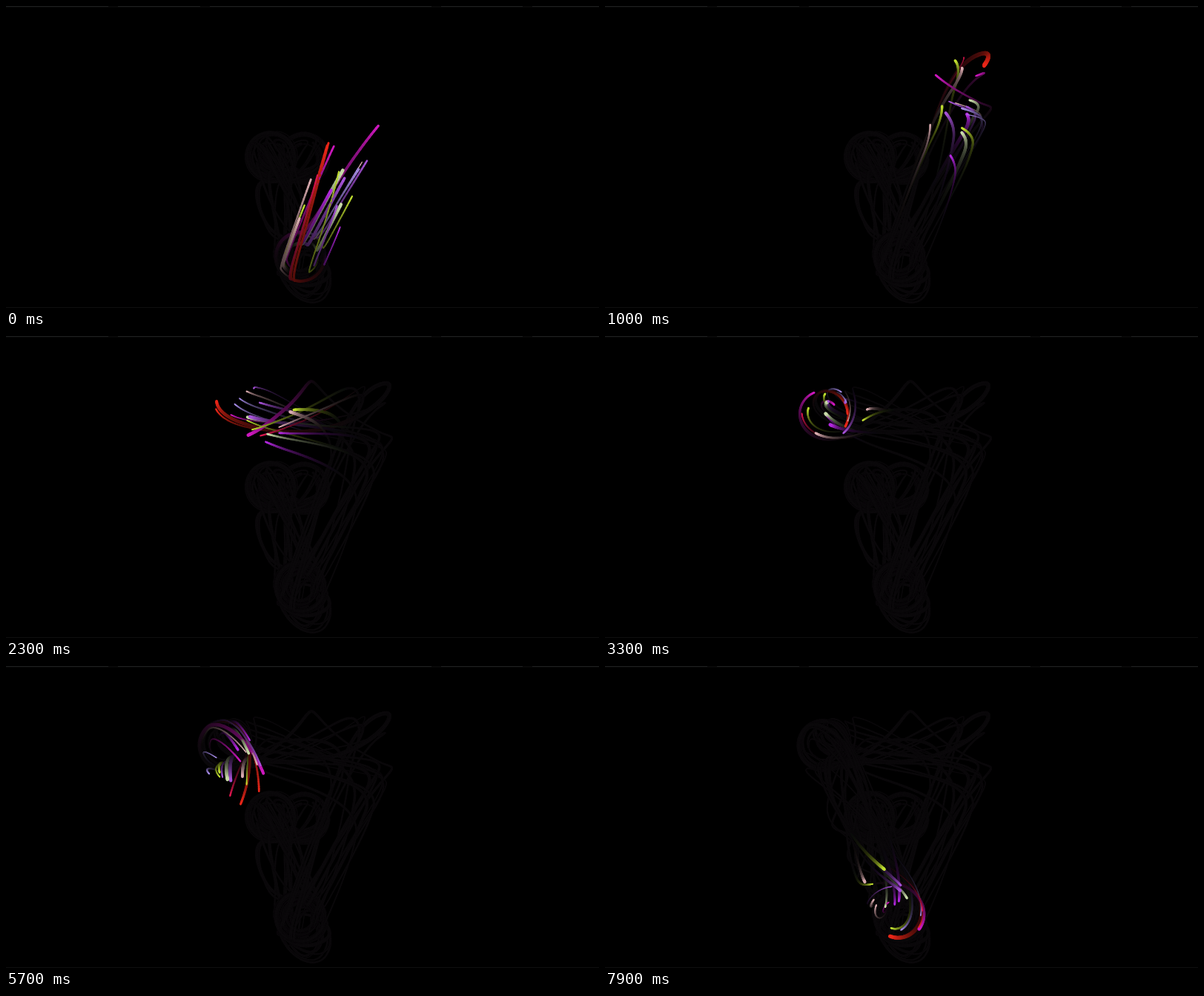
Write an HTML page with a canvas that moves like this. It is 800 px wide and 407 px high and loops after 8 s.

```html
<!DOCTYPE html>
<html lang="en">
<head>
<meta charset="utf-8">
<title>Light trails</title>
<style>
  html, body { margin: 0; width: 100%; height: 100%; overflow: hidden; background: #000; }
  canvas { display: block; width: 800px; height: 407px; }
</style>
</head>
<body>
<canvas id="stage" width="800" height="407"></canvas>
<script>
const W = 800, H = 407;
const LOOP = 8000, STEP = 100, TICKS = 6;   // ticks of motion per displayed step
const START = -660, END = 480, TAIL = 60;
const FADE = 0.95, GHOST = [10, 8, 10];

const RED = [232, 38, 24], CRIMSON = [222, 22, 78], MAGENTA = [205, 24, 190],
      PURPLE = [178, 40, 222], VIOLET = [165, 82, 215], LAVENDER = [166, 140, 232],
      LIME = [192, 222, 48], PALE = [200, 218, 168], PINK = [218, 172, 176];

// colour, speed (1/1000 per tick), orbit radius, angle at tick 0 (deg), width
const DOTS = [
  [PINK, 27, 31, 182, 2.8], [CRIMSON, 34, 33, 158, 1.8], [RED, 51, 33, 168, 4.2],
  [MAGENTA, 40, 19, 218, 2.2], [MAGENTA, 55, 33, 344, 3.6], [LIME, 40, 24, 110, 2.6],
  [PALE, 27, 18, 312, 3.6], [LIME, 16, 24, 185, 3.2], [PURPLE, 18, 18, 300, 3.6],
  [VIOLET, 25, 19, 333, 3.4], [LAVENDER, 30, 30, 345, 2], [VIOLET, 36, 34, 357, 2],
  [PINK, 34, 30, 350, 1.6], [LIME, 21, 33, 5, 2.4], [LAVENDER, 28, 35, 340, 1.6],
  [PURPLE, 14, 34, 36, 2.6], [PALE, 17, 24, 0, 3.4], [PINK, 13, 26, 170, 3.2],
  [VIOLET, 22, 22, 60, 3], [RED, 48, 32, 172, 2.2]
];

// pointer path: tick, x, y
const PATH = [
  [START, 402, 205], [-560, 402, 205], [-535, 356, 204], [-420, 356, 204],
  [-395, 406, 372], [-325, 406, 372], [-295, 397, 338], [-22, 397, 338],
  [-15, 509, 83], [36, 509, 83], [120, 294, 107], [306, 294, 107],
  [406, 398, 335], [END, 398, 335]
];

function pointer(k) {
  let i = 1;
  while (i < PATH.length - 1 && PATH[i][0] < k) i++;
  const [k0, x0, y0] = PATH[i - 1], [k1, x1, y1] = PATH[i];
  const u = (k - k0) / (k1 - k0);
  return [x0 + (x1 - x0) * u, y0 + (y1 - y0) * u];
}

// Each dot circles a point that eases towards the pointer.
function trace([color, rate, orbit, deg, width], index) {
  const speed = rate / 1000, points = [];
  let [cx, cy] = pointer(START);
  for (let k = START; k <= END; k++) {
    const [mx, my] = pointer(k);
    cx += (mx - cx) * speed;
    cy += (my - cy) * speed;
    const a = deg * Math.PI / 180 + k * speed;
    const swell = 1 + 0.3 * Math.sin(k * 0.035 + index * 2.4);
    points.push([cx + Math.cos(a) * orbit, cy + Math.sin(a) * orbit, width * swell]);
  }
  return { color, points };
}

const dots = DOTS.map(trace);
const ctx = document.getElementById('stage').getContext('2d');
const ghost = document.createElement('canvas');
ghost.width = W;
ghost.height = H;
const ghostCtx = ghost.getContext('2d');
let ghostTick = END + 1;

function segment(c, dot, k, rgb) {
  const a = dot.points[k - START - 1], b = dot.points[k - START];
  c.strokeStyle = `rgb(${rgb.join()})`;
  c.lineWidth = Math.max(0.8, b[2]);
  c.lineCap = 'round';
  c.beginPath();
  c.moveTo(a[0], a[1]);
  c.lineTo(b[0], b[1]);
  c.stroke();
}

function growGhost(until) {
  if (until < ghostTick) {
    ghostCtx.clearRect(0, 0, W, H);
    ghostTick = START;
  }
  while (ghostTick < until) {
    ghostTick++;
    for (const dot of dots) segment(ghostCtx, dot, ghostTick, GHOST);
  }
}

function edges() {
  ctx.fillStyle = '#1c1d1e';
  ctx.fillRect(0, 0, W, 1);
  ctx.fillStyle = '#0b0b0b';
  ctx.fillRect(0, 1, W, 1);
  ctx.fillStyle = '#080808';
  for (const x of [138, 262, 574, 697]) ctx.fillRect(x, 0, 13, 2);
  ctx.fillStyle = '#0f0f0f';
  ctx.fillRect(0, H - 1, W, 1);
}

function draw(tick) {
  ctx.fillStyle = '#000';
  ctx.fillRect(0, 0, W, H);
  growGhost(tick - TAIL);
  ctx.drawImage(ghost, 0, 0);
  for (let age = TAIL - 1; age >= 0; age--) {
    const glow = FADE ** age;
    for (const dot of dots) {
      const rgb = dot.color.map((v, i) => Math.round(Math.max(GHOST[i], v * glow)));
      segment(ctx, dot, tick - age, rgb);
    }
  }
  edges();
}

const begin = performance.now();
let shown = -1;
function frame() {
  const t = Math.max(0, performance.now() - begin) % LOOP;
  const step = Math.floor(t / STEP);
  if (step !== shown) draw((shown = step) * TICKS);
  requestAnimationFrame(frame);
}
frame();
</script>
</body>
</html>
```
